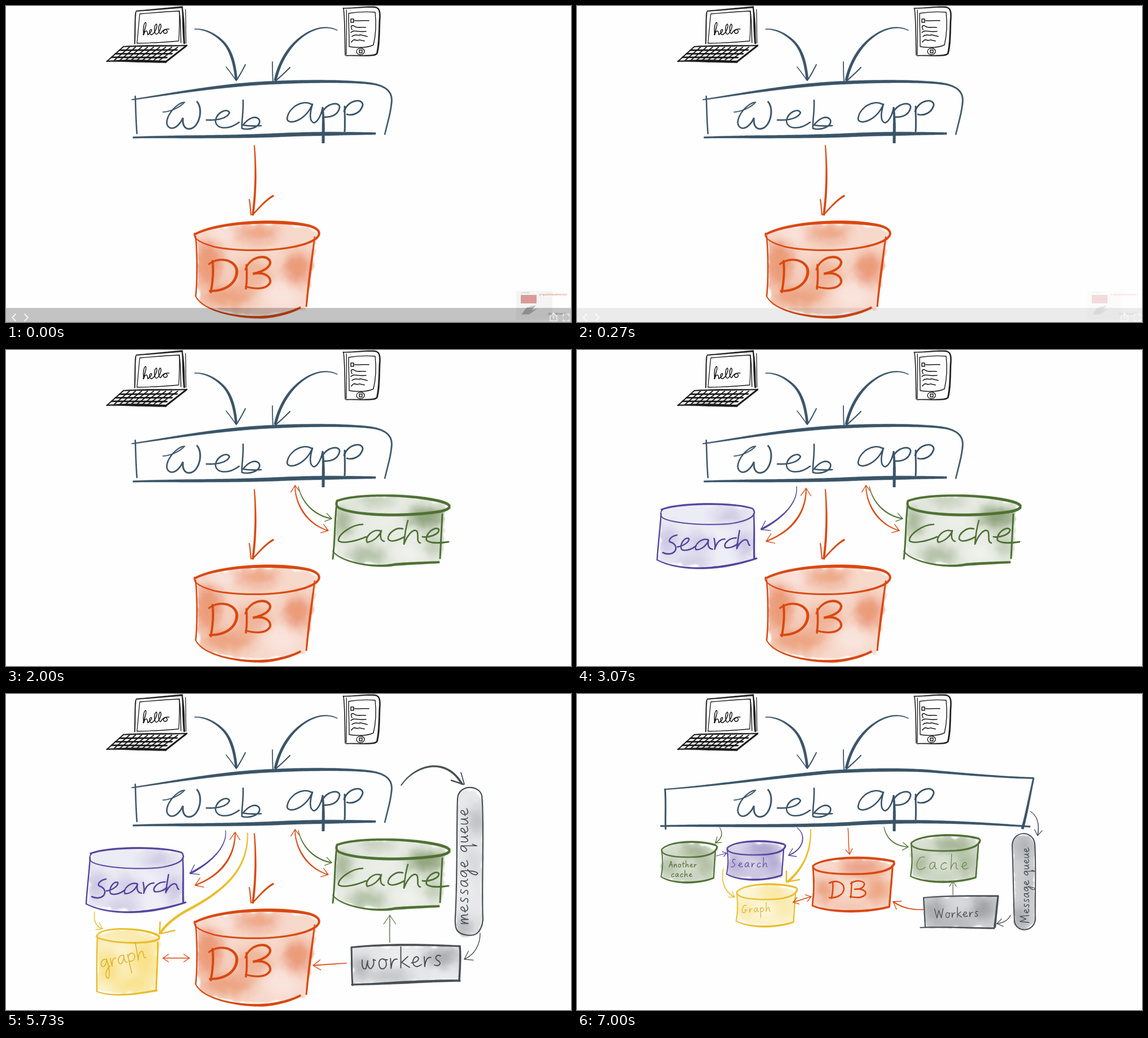
An HTML page that plays this animation: 1001 px wide and 560 px high, repeating every 8 s.

```html
<!DOCTYPE html>
<html lang="en">
<head>
<meta charset="utf-8">
<title>Growing architecture sketch</title>
<style>
html, body { margin: 0; width: 100%; height: 100%; overflow: hidden; background: #fefefe; }
svg { display: block; width: 100vw; height: 100vh; }
</style>
</head>
<body>
<svg id="stage" viewBox="0 0 1001 560" fill="none" stroke-linecap="round" stroke-linejoin="round">
  <defs>
    <filter id="soft" x="-100%" y="-100%" width="300%" height="300%"><feGaussianBlur stdDeviation="10"/></filter>
    <filter id="edge" x="-10%" y="-10%" width="120%" height="120%">
      <feTurbulence type="fractalNoise" baseFrequency=".06" numOctaves="2" seed="4"/>
      <feDisplacementMap in="SourceGraphic" scale="13" xChannelSelector="R" yChannelSelector="G" result="rough"/>
      <feGaussianBlur in="rough" stdDeviation="1"/>
    </filter>
  </defs>
</svg>
<script>
const NS = 'http://www.w3.org/2000/svg';
const stage = document.getElementById('stage');
const LOOP = 8000;
const NAVY = '#3a5468', ORANGE = '#d9470f', GREEN = '#4f7033', PURPLE = '#54439c';
const YELLOW = '#e9bd2c', GOLD = '#f5d24a', GREY = '#474e54', BLACK = '#1b1b1b';
const scenes = [];

function add(parent, tag, attrs) {
  const node = document.createElementNS(NS, tag);
  for (const key in attrs) node.setAttribute(key, attrs[key]);
  parent.appendChild(node);
  return node;
}

function scene(from, to) {
  const node = add(stage, 'g', {});
  scenes.push({ node, from, to });
  return node;
}

// One stroke whose width runs through the given values along its length.
function brush(g, color, d, ...widths) {
  if (widths.length < 2) return add(g, 'path', { d, stroke: color, 'stroke-width': widths[0] || 2 });
  const path = add(g, 'path', { d });
  const len = path.getTotalLength(), n = Math.max(12, Math.ceil(len / 4));
  const left = [], right = [];
  for (let i = 0; i <= n; i++) {
    const s = len * i / n, p = path.getPointAtLength(s);
    const a = path.getPointAtLength(Math.max(0, s - 1)), b = path.getPointAtLength(Math.min(len, s + 1));
    const k = i / n * (widths.length - 1), j = Math.min(widths.length - 2, Math.floor(k));
    const half = (widths[j] + (widths[j + 1] - widths[j]) * (k - j)) / 2 - .25;
    const m = Math.hypot(b.x - a.x, b.y - a.y) || 1;
    const nx = -(b.y - a.y) / m * half, ny = (b.x - a.x) / m * half;
    left.push(`${(p.x + nx).toFixed(2)} ${(p.y + ny).toFixed(2)}`);
    right.unshift(`${(p.x - nx).toFixed(2)} ${(p.y - ny).toFixed(2)}`);
  }
  path.setAttribute('d', `M${left.concat(right).join('L')}Z`);
  path.setAttribute('fill', color);
  path.setAttribute('stroke', color);
  path.setAttribute('stroke-width', .5);
}

function ink(g, color, strokes) {
  for (const stroke of strokes) brush(g, color, ...stroke);
}

function arrow(g, color, d, widths, size = 13, both = false) {
  brush(g, color, d, ...widths);
  const probe = add(g, 'path', { d }), len = probe.getTotalLength();
  const barb = (tipAt, backAt) => {
    const tip = probe.getPointAtLength(tipAt), back = probe.getPointAtLength(backAt);
    const angle = Math.atan2(back.y - tip.y, back.x - tip.x);
    const end = turn => `${tip.x + size * Math.cos(angle + turn)} ${tip.y + size * Math.sin(angle + turn)}`;
    brush(g, color, `M${end(.6)}L${tip.x} ${tip.y}L${end(-.6)}`, 1.3);
  };
  barb(len, len - 8);
  if (both) barb(0, 8);
  probe.remove();
}

let washes = 0;
// Soft watercolour inside an outline; blobs are x, y, rx, ry, opacity, and negative opacity is bare paper.
function wash(g, color, outline, base, blobs) {
  const id = `wash${washes++}`;
  add(add(g, 'clipPath', { id }), 'path', { d: outline });
  const paint = add(add(g, 'g', { filter: 'url(#edge)' }), 'g', { 'clip-path': `url(#${id})` });
  add(paint, 'path', { d: outline, fill: color, opacity: base });
  for (const [cx, cy, rx, ry, opacity] of blobs)
    add(paint, 'ellipse', { cx, cy, rx, ry, fill: opacity < 0 ? '#fff' : color, opacity: Math.abs(opacity), filter: 'url(#soft)' });
}

// Pen letters: advance width, then strokes with an x-height of ten units.
const LETTERS = {
  a: [10, 'M8-9C3-11 0-6 1-2C3 2 7-3 8-9C7-4 8 0 10-1'],
  c: [8, 'M8-8C4-11 0-5 1-2C2 1 6 0 8-2'],
  e: [9, 'M0-4C5-4 8-7 6-9C3-11 0-5 2-2C4 1 7-1 9-2'],
  g: [10, 'M8-9C3-11 0-6 1-3C3 0 7-4 8-9C9-2 8 10 5 12C1 10 4 3 10-1'],
  h: [10, 'M2-20C2-12 1-5 1 0C2-6 6-11 8-8C8-5 7 0 10-1'],
  k: [9, 'M2-19L1 0M8-10L2-5L9 0'],
  m: [13, 'M1-9L1 0C2-6 5-11 6-8L6 0C7-6 10-11 11-8C12-4 11 0 13-1'],
  n: [9, 'M1-9L1 0C2-6 6-11 7-8C8-4 7 0 9-1'],
  o: [9, 'M5-9C0-10 0 0 4 0C9 0 9-9 5-9C6-8 8-8 9-8'],
  p: [9, 'M1-9L1 12M1-6C4-12 10-9 8-4C6 0 3 0 1-2'],
  q: [10, 'M8-9C3-11 0-6 1-3C3 0 7-4 8-9L8 11L10 5'],
  r: [7, 'M1-9L1 0C2-6 4-9 7-8'],
  s: [8, 'M7-9C3-11 1-7 4-5C8-3 6 1 1-1'],
  t: [6, 'M3-16C2-8 2 0 5 0M0-10L7-11'],
  u: [9, 'M1-9C0-3 1 1 4-1C6-3 7-6 7-9C7-5 7 0 9-1'],
  w: [13, 'M1-9C0-2 2 0 4-1L6-8C5-2 8 0 9-1C11-3 12-6 11-9L13-8'],
  A: [11, 'M0 0L6-18L10 0M2-6L10-7'],
  C: [12, 'M11-16C4-19 0-8 1-3C3 2 9 0 12-3'],
  G: [13, 'M11-16C4-19 0-8 1-3C3 2 9 0 10-6L6-6L12-6'],
  M: [16, 'M0 0L2-18L7-6L12-18L14 0'],
  S: [11, 'M9-16C4-19 1-12 5-9C10-6 7 1 0-1'],
  W: [17, 'M0-17L4 0L8-14L12 0L16-17'],
  ' ': [6, '']
};

function write(g, color, word, x, y, scale, gap, width, turn = 0) {
  const line = add(g, 'g', { transform: `translate(${x} ${y}) rotate(${turn})`, role: 'img', 'aria-label': word });
  let pen = 0;
  for (const char of word) {
    const [advance, d] = LETTERS[char];
    add(line, 'path', { d, stroke: color, 'stroke-width': width / scale, transform: `translate(${pen} 0) scale(${scale})` });
    pen += advance * scale + gap;
  }
}

function drawDevices(g) {
  ink(g, BLACK, [
    ['M228 67C229 48 228 28 230 9C258 7 286 4 313 2', 2, 2, 3],
    ['M312 2C315 22 314 45 316 67', 2, 4, 3], ['M318 6C319 25 318 45 319 66', 1.2],
    ['M237 14C235 32 234 49 232 66C257 66 282 64 306 62C307 45 308 27 307 9C284 10 260 12 237 14', 1.3],
    ['M307 9C310 28 309 46 310 65', 1.5],
    ['M243 51C246 42 250 30 247 29C243 32 243 45 244 51C246 43 251 41 251 51C253 50 259 45 258 42C254 40 252 50 258 51C264 48 270 34 266 32C262 35 262 51 267 50C273 46 277 33 273 32C269 36 270 50 274 49C277 44 281 40 284 42C288 46 284 50 280 48C277 45 281 40 289 41', 1.5],
    ['M208 72C245 70 283 71 320 70', 2, 3, 2], ['M208 72L179 98', 2], ['M320 70L283 99', 3],
    ['M178 98C214 96 250 98 284 99', 2, 5, 4]
  ]);
  for (let i = 1; i < 4; i++) brush(g, BLACK, `M${208 - i * 7} ${72 + i * 6.3}L${312 - i * 9} ${71 + i * 6.8}`, 2.8);
  for (let i = 1; i < 10; i++) brush(g, BLACK, `M${208 + i * 10.7} 73L${182 + i * 10} 96`, 1.9);
  ink(g, BLACK, [
    ['M598 4C601 31 600 59 601 87', 1.6], ['M603 7C604 30 603 55 603 86', 1.3],
    ['M597 4C618 4 636 1 652 2C663 2 663 12 662 25C661 50 661 70 657 85C650 90 620 87 602 88', 1.5, 2.5, 3, 1.5],
    ['M608 72C608 52 607 32 607 13C624 10 640 10 654 11C656 30 655 52 651 69C638 75 621 74 608 72', 1.4],
    ['M611 23h5v6h-5zM618 26C626 27 634 25 643 26M613 42C609 34 614 33 619 37C625 39 631 37 637 38M611 47C617 41 623 47 638 45M613 54C619 48 624 54 628 51L640 54M612 64C617 55 621 64 626 60L635 62', 1.6],
    ['M621 81C621 73 635 73 635 80C635 88 622 88 621 81M626 78h5v5h-5z', 1.5]
  ]);
}

function drawTitle(g) {
  ink(g, NAVY, [
    ['M334 41C352 40 370 49 385 64C398 78 405 100 408 131', 1.5, 3.5, 5, 4.5],
    ['M390 108C396 115 402 124 407 131', 1.6], ['M424 104C420 112 415 122 408 132', 2],
    ['M587 43C560 30 530 46 510 67C495 83 483 105 477 132', 1.5, 3, 5, 5],
    ['M472 99C472 110 472 122 473 134', 1.8], ['M503 109C495 117 485 127 476 134', 2.2]
  ]);
  ink(g, NAVY, [
    ['M278 188C292 187 308 180 317 170C302 172 283 194 285 209C289 223 306 217 314 197C311 213 319 222 331 216C344 208 349 181 338 169', 1.8, 2.5, 3, 3],
    ['M355 202C375 203 392 199 396 189C392 180 374 188 371 203C372 220 396 219 413 206', 2.6],
    ['M420 167C421 188 417 204 418 217C432 221 452 214 449 202C442 192 428 200 420 211C430 213 441 213 452 212', 2.6],
    ['M541 174C525 165 500 180 498 200C500 212 530 204 543 174C538 190 537 205 546 207C552 205 558 195 561 180', 2.6],
    ['M561 180C563 200 562 222 562 243', 3, 5, 5], ['M560 190C566 172 592 168 591 180C588 194 575 197 564 197', 2.8],
    ['M600 178C600 195 601 208 600 222', 3], ['M599 187C606 165 633 163 632 176C628 190 614 195 604 192', 2.8]
  ]);
}

function drawDb(g) {
  wash(g, ORANGE, 'M338 403C380 381 525 381 552 402C548 440 540 500 527 538C490 548 400 553 347 528C338 500 338 440 338 403', .2,
    [[358, 455, 26, 42, .42], [392, 515, 48, 20, .36], [445, 403, 38, 14, .38], [516, 465, 26, 30, .42], [436, 475, 34, 26, .25], [375, 405, 26, 10, -.4], [490, 512, 28, 24, -.3]]);
  ink(g, ORANGE, [
    ['M440 247C443 285 443 330 437 371', 2, 3.5, 4], ['M431 343C433 352 433 364 434 370', 2], ['M474 336C461 343 448 358 437 370', 3.5, 2.5],
    ['M334 405C375 382 480 378 535 389C556 394 562 405 545 415C510 435 420 437 370 427C345 420 330 412 334 402', 4, 5, 6, 4, 3, 3, 2],
    ['M547 409C543 440 536 490 532 533', 2.5, 4, 3], ['M336 408C339 440 339 490 336 514', 2.5],
    ['M336 514C350 545 430 556 470 550C500 545 515 538 522 534', 2, 3, 5, 4],
    ['M366 452C368 470 366 490 363 507', 4], ['M359 458C375 444 405 448 409 468C410 490 390 506 360 505', 3, 5, 4],
    ['M426 459C427 475 427 488 425 501', 3.5],
    ['M424 468C430 445 460 438 468 452C470 465 450 472 436 475C455 470 470 478 468 490C462 503 440 502 424 497', 3, 4.5, 4, 4, 3]
  ]);
}

function drawCache(g) {
  wash(g, GREEN, 'M587 268C630 253 745 258 779 273L770 377C710 382 630 386 581 365L587 268', .13,
    [[745, 296, 34, 18, .6], [596, 305, 16, 24, .45], [655, 266, 34, 9, .3], [640, 364, 34, 14, .38], [756, 345, 14, 20, .3], [675, 303, 26, 10, -.3], [715, 360, 26, 14, -.4]]);
  ink(g, GREEN, [
    ['M586 268C610 256 700 254 760 266C790 272 795 280 770 286C710 296 620 294 590 280C584 276 584 270 588 266', 4, 4, 5, 5, 5, 4],
    ['M586 272C582 300 583 340 579 370', 3], ['M773 291C772 315 770 345 769 369', 3],
    ['M579 356C590 375 650 388 690 380C720 378 745 377 768 376', 2, 3, 5, 4],
    ['M632 309C613 309 588 327 589 338C595 344 620 339 638 331', 2.6],
    ['M664 321C650 315 634 333 640 341C652 339 662 329 665 320C662 331 664 338 670 339', 2.6],
    ['M703 317C690 313 676 326 677 335C682 342 695 337 706 331', 2.6],
    ['M712 302C708 316 706 331 705 344C712 326 722 316 728 321C732 329 726 339 734 342', 2.6],
    ['M738 331C748 333 768 327 767 318C760 311 742 326 745 337C752 344 770 342 784 340', 2.8]
  ]);
  arrow(g, GREEN, 'M518 242C524 270 545 293 577 299', [1.2, 2.4, 2.2]);
  arrow(g, ORANGE, 'M512 240C512 275 535 310 571 320', [1.5, 2.8, 1.6], 14, true);
}

function drawSearch(g) {
  wash(g, PURPLE, 'M150 282C190 271 285 270 313 284L313 370C265 387 190 388 146 372L150 282', .1,
    [[160, 338, 16, 26, .22], [270, 294, 30, 10, .26], [215, 340, 26, 14, .2], [297, 345, 14, 22, .26], [205, 376, 34, 9, .24], [250, 324, 20, 8, -.4], [260, 368, 24, 10, -.3]]);
  ink(g, PURPLE, [
    ['M149 283C180 270 280 270 311 281C320 290 312 302 270 308C220 312 160 306 150 296C147 290 148 286 152 283', 3, 3.5, 3, 2, 2, 2],
    ['M149 290C147 320 143 350 142 372', 2.4], ['M313 290C315 317 313 344 314 370', 2.5, 3.5],
    ['M142 372C180 392 250 392 319 369', 2, 3, 4, 3],
    ['M177 328C166 330 161 338 165 340C174 343 178 350 173 357C167 363 158 362 152 359', 2.6],
    ['M178 349C190 347 200 339 198 334C190 331 180 347 186 354C195 357 205 352 211 347', 2.5],
    ['M232 336C220 333 206 346 211 354C221 354 230 346 233 337C231 346 233 352 240 353', 2.5],
    ['M243 334C245 342 245 348 244 353C247 342 252 335 262 335', 2.5],
    ['M282 333C268 333 259 344 263 350C270 352 280 348 285 343', 2.5],
    ['M288 320C285 335 284 345 283 352C288 340 297 333 302 338C304 342 303 345 306 346', 2.5]
  ]);
  arrow(g, PURPLE, 'M389 242C392 270 365 298 326 318', [1.2, 2.4, 3.8], 17);
  arrow(g, ORANGE, 'M406 245C406 285 385 320 335 339', [1.8, 3.4, 2.2], 16, true);
}

function drawWorkers(g) {
  wash(g, GREY, 'M800 182C806 162 838 164 844 190L843 395C840 435 803 440 797 410L800 182', .12,
    [[834, 225, 10, 28, .35], [828, 300, 8, 25, .18], [812, 412, 16, 16, .36], [812, 340, 8, 28, -.3]]);
  wash(g, GREY, 'M612 449L803 447L805 506L615 515Z', .13,
    [[628, 485, 14, 22, .36], [772, 466, 32, 14, .42], [680, 500, 40, 8, .34], [700, 462, 24, 12, -.35], [775, 502, 18, 8, -.35]]);
  ink(g, GREY, [
    ['M800 185C802 160 838 160 843 180C848 230 842 350 845 400C842 425 830 430 815 427C797 424 795 415 796 395C800 330 798 240 800 185', 2.2],
    ['M612 449C670 443 740 444 805 447', 3, 4, 3], ['M612 449C613 475 612 495 614 516', 3],
    ['M612 515C670 514 740 508 805 508', 3, 5, 4], ['M804 447C806 468 804 488 803 508', 3.5],
    ['M700 162C725 125 780 110 808 160', 2, 3, 3.5, 4], ['M789 153L810 160', 2.5], ['M806 139L812 160', 1.8]
  ]);
  write(g, GREY, 'message queue', 819, 408, 1.4, 3.2, 1.6, -90);
  write(g, GREY, 'workers', 630, 489, 1.95, 3.7, 1.9, -3);
  arrow(g, GREY, 'M840 424C840 445 830 462 812 470', [1.4], 16);
  arrow(g, '#6b7c5e', 'M680 440C679 425 680 410 680 392', [1.6], 19);
  arrow(g, ORANGE, 'M603 477L544 481', [1.5, 2], 16);
}

function drawGraph(g) {
  wash(g, GOLD, 'M161 428C185 412 255 416 270 433L265 524C230 533 190 533 163 524L161 428', .35,
    [[180, 485, 18, 28, .5], [245, 470, 20, 34, .45], [210, 425, 30, 8, .25], [225, 515, 32, 12, .5], [205, 452, 18, 10, -.3], [168, 518, 10, 14, -.4]]);
  ink(g, YELLOW, [
    ['M160 430C165 414 215 414 245 420C275 426 280 434 260 438C230 444 180 440 163 432', 2.5, 3, 4, 3, 2.5],
    ['M162 430C160 465 161 500 161 527', 2.5], ['M269 440C269 468 267 496 266 524', 3],
    ['M160 527C190 538 230 532 268 525', 2, 3, 4],
    ['M428 246C430 318 375 355 318 385C300 395 282 410 273 424', 2, 3.5, 4.5, 4.5],
    ['M273 404L272 425L299 419', 2.5]
  ]);
  write(g, '#dcb02a', 'graph', 169, 487, 1.6, 2, 1.5, -13);
  arrow(g, YELLOW, 'M157 386C155 400 158 412 171 416', [1.4], 12);
  arrow(g, ORANGE, 'M278 468L325 468', [1.4], 12, true);
}

function drawSmallBox(g) {
  ink(g, NAVY, [
    ['M223 166C280 158 360 143 450 137C540 132 620 133 650 138C680 143 685 158 683 172C681 192 675 210 671 228', 2, 4, 6, 6, 5, 3, 2.5],
    ['M229 160C230 180 230 205 232 226', 2.5],
    ['M225 233C300 231 400 233 500 228C560 226 620 226 655 226', 3, 5, 6, 7, 7, 4]
  ]);
}

function drawWideBox(g) {
  ink(g, NAVY, [
    ['M155 169C250 162 340 148 450 138C540 133 600 134 640 138C700 143 760 148 809 149', 2, 4, 6, 6, 4, 3],
    ['M156 169C158 192 156 216 157 239', 3], ['M148 234C250 232 400 236 500 229C600 223 700 228 803 235', 3, 5, 6, 7, 5, 3],
    ['M809 149C802 180 796 215 789 239', 3, 5]
  ]);
}

// A small drum: lid curve, left, right and base lines.
function drum(g, color, x, y, w, h, lid, weight = 2.3, paint = color) {
  const r = x + w, b = y + h, mid = y + lid / 2, foot = r - w * .06;
  wash(g, paint, `M${x + 1} ${mid}C${x + w * .2} ${y - 2} ${r - w * .2} ${y - 2} ${r - 3} ${mid}L${foot} ${b - 7}C${r - w * .3} ${b + 2} ${x + w * .3} ${b + 2} ${x + 2} ${b - 10}Z`, .2,
    [[x + w * .6, y + lid * .6, w * .27, lid * .4, .5], [x + w * .14, y + h * .6, w * .12, h * .22, .4], [x + w * .8, y + h * .6, w * .15, h * .25, .35], [x + w * .45, b - 8, w * .25, 8, .2]]);
  ink(g, color, [
    [`M${x + 1} ${mid}C${x + w * .15} ${y - 3} ${r - w * .25} ${y - 3} ${r} ${y + lid * .25}C${r + 2} ${y + lid * .8} ${r - w * .25} ${y + lid} ${x + w * .55} ${y + lid}C${x + w * .2} ${y + lid + 1} ${x - 1} ${y + lid * .85} ${x + 1} ${mid}`, weight, weight + 1.2, weight + 1, weight, weight],
    [`M${x + 1} ${mid + 2}C${x + 4} ${y + h * .55} ${x + 2} ${y + h * .7} ${x} ${b - 10}`, weight - .4],
    [`M${r - 3} ${mid + 4}L${foot} ${b - 8}`, weight],
    [`M${x} ${b - 10}C${x + w * .22} ${b + 4} ${r - w * .3} ${b + 2} ${foot} ${b - 8}`, weight - .4, weight + 1.2, weight + .5]
  ]);
}

function drawFinal(g) {
  drawWideBox(g);
  drum(g, GREEN, 149, 262, 99, 72, 27);
  drum(g, PURPLE, 265, 261, 104, 68, 24);
  drum(g, YELLOW, 282, 337, 108, 75, 27, 2.3, GOLD);
  drum(g, ORANGE, 417, 290, 145, 95, 29, 3.2);
  drum(g, GREEN, 591, 250, 123, 83, 28, 2.6);
  wash(g, GREY, 'M772 262C776 244 806 246 811 264L811 400C808 422 776 424 774 402Z', .25,
    [[792, 270, 15, 22, .25], [784, 395, 12, 22, .35], [802, 330, 8, 30, .15]]);
  wash(g, GREY, 'M614 361L746 358L740 413L617 414Z', .25,
    [[632, 385, 14, 22, .35], [720, 380, 20, 18, .4], [670, 405, 34, 8, .3], [680, 370, 20, 8, -.35]]);
  ink(g, GREY, [
    ['M771 268C773 240 808 242 811 265C814 310 811 360 812 400C809 422 779 424 775 403C773 355 773 315 771 268', 2],
    ['M614 361C658 357 702 358 747 358', 2, 3], ['M614 361L617 413', 2.2], ['M608 414C650 412 695 415 740 415', 2, 3], ['M746 358L740 414', 3, 4]
  ]);
  ink(g, ORANGE, [
    ['M453 333C454 343 453 353 451 362', 2.6], ['M447 335C460 328 473 335 473 345C472 356 460 362 447 361', 2.6],
    ['M487 333L485 361', 2.4], ['M485 336C494 328 511 331 509 338C507 345 498 346 492 346C504 344 514 349 511 355C505 363 493 361 484 359', 2.5]
  ]);
  write(g, GREEN, 'Another', 163, 307, .6, 2, 1.1);
  write(g, GREEN, 'cache', 167, 324, .6, 2.5, 1.1);
  write(g, PURPLE, 'Search', 273, 307, .85, 3.5, 1.1);
  write(g, '#dcae28', 'Graph', 292, 388, .8, 2.8, 1.1, -3);
  write(g, '#6f8a57', 'Cache', 601, 311, 1.35, 6.5, 1.3);
  write(g, GREY, 'Workers', 634, 397, .95, 2.5, 1.3, -2);
  write(g, GREY, 'Message queue', 801, 405, .9, 1.9, 1.3, -90);
  arrow(g, GREEN, 'M253 237C260 248 255 258 245 264', [1.2, 1.8], 11);
  arrow(g, PURPLE, 'M247 287L265 282', [1.2], 8);
  arrow(g, PURPLE, 'M390 237C407 250 402 275 375 286', [1.2, 2, 2], 14);
  arrow(g, YELLOW, 'M259 310C255 335 262 350 279 360', [1.5, 2], 11);
  ink(g, YELLOW, [['M414 240C415 280 400 310 373 333', 2, 3, 4.5], ['M371 314L371 333L394 329', 2.6]]);
  arrow(g, ORANGE, 'M480 238C482 253 480 269 483 284', [1.4], 11);
  arrow(g, GREEN, 'M544 236C548 258 565 270 587 271', [1.2, 2, 1.6], 12);
  arrow(g, '#6b7c5e', 'M666 356L666 332', [1.4], 11);
  arrow(g, ORANGE, 'M615 382C590 383 575 378 560 368', [1.5, 2.4], 15);
  arrow(g, ORANGE, 'M383 369L415 359', [1.4], 11, true);
  arrow(g, GREY, 'M803 208C815 215 820 230 816 251', [1.2, 1.8], 12);
  arrow(g, GREY, 'M768 392C765 400 755 406 744 407', [1.4], 12);
}

function drawControls(g) {
  add(g, 'rect', { x: 904, y: 505, width: 64, height: 51, fill: '#999', opacity: .1 });
  add(g, 'rect', { x: 912, y: 512, width: 28, height: 15, fill: '#c4524c', opacity: .55 });
  add(g, 'path', { d: 'M913 508h14M914 546L922 535L938 531L930 540L940 537L927 546Z', fill: '#888', stroke: '#999', opacity: .55 });
  const label = (x, y, fill, text) => {
    add(g, 'text', { x, y, fill, 'font-family': 'Lato, sans-serif', 'font-size': 6, 'font-style': 'italic' }).textContent = text;
  };
  label(945, 513, '#e08a68', 'p-quietmeadow.net');
  label(960, 547, '#999', '@quietmead');
  add(g, 'rect', { y: 535, width: 1001, height: 25, fill: '#000', opacity: .23 });
  brush(g, '#fff', 'M17 546L11 552L17 558M33 546L39 552L33 558', 1.6);
  brush(g, '#fff', 'M967 549h-3v9h12v-9h-3M970 554v-10M967 547l3-3l3 3M987 550v-4h4M994 546h4v4M998 555v3h-4M991 558h-4v-3', 1.2);
}

drawDb(scene(0, 7000));
drawSmallBox(scene(0, 7000));
drawCache(scene(2000, 7000));
drawSearch(scene(3070, 7000));
drawWorkers(scene(4200, 7000));
drawGraph(scene(5730, 7000));
drawFinal(scene(7000, LOOP));
const always = scene(0, LOOP);
drawDevices(always);
drawTitle(always);
const controls = scene(0, 400);
drawControls(controls);

function render(t) {
  for (const { node, from, to } of scenes) node.style.display = t >= from && t < to ? '' : 'none';
  const step = t < 70 ? 0 : Math.min(6, Math.floor((t - 70) / 66) + 1);
  controls.style.opacity = 1 - step / 6;
}

const start = performance.now();
function tick() {
  render((performance.now() - start) % LOOP);
  requestAnimationFrame(tick);
}
render(0);
requestAnimationFrame(tick);
</script>
</body>
</html>
```
